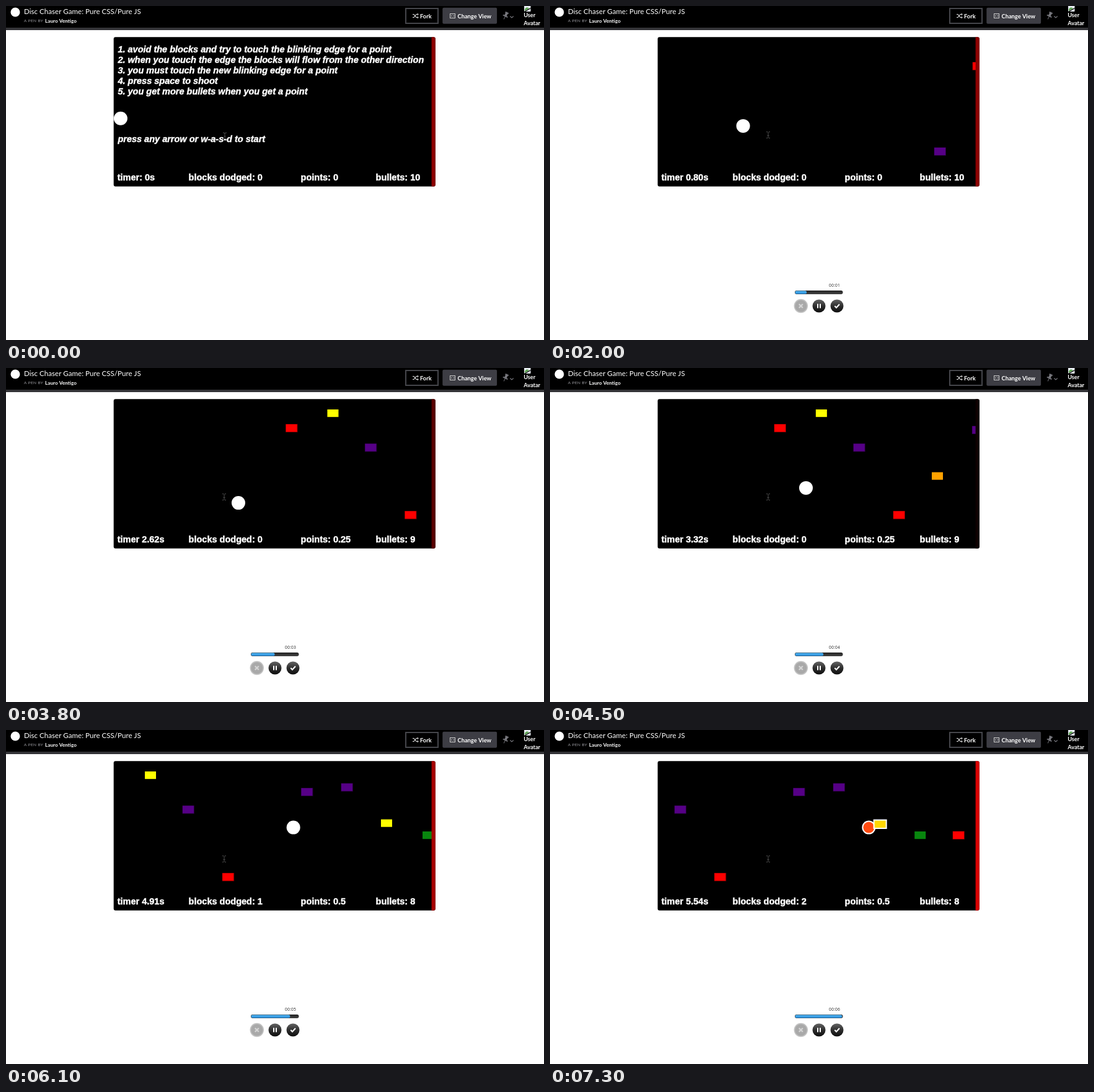
An HTML page with a canvas that plays this animation: 868x540 px, repeating every 7.4 s.

```html
<!DOCTYPE html>
<html lang="en">
<head>
<meta charset="utf-8">
<title>Disc Chaser Game</title>
<style>
  html, body { margin: 0; width: 100%; height: 100%; overflow: hidden; background: #fff; }
  canvas { display: block; }
</style>
</head>
<body>
<canvas id="stage" width="868" height="540"></canvas>
<script>
const ctx = document.getElementById('stage').getContext('2d');
const LOOP = 7400, TICK = 100;
const START = 1200, CRASH = 6755, RECORDER_ON = 300;
const BOARD = { x: 173.7, y: 50.3, w: 519.1, h: 241.4 };
const EDGE = 687, SPEED = 0.128;
const LATO = 'Lato, sans-serif';
const HELV = '"Liberation Sans", Arial, sans-serif';
const RULES = [
  '1. avoid the blocks and try to touch the blinking edge for a point',
  '2. when you touch the edge the blocks will flow from the other direction',
  '3. you must touch the new blinking edge for a point',
  '4. press space to shoot',
  '5. you get more bullets when you get a point'
];
const RED = '#fe0000', PURPLE = '#560086', YELLOW = '#ffff00';

// spawn: time at which the left side meets the edge; end: time it is shot
const blocks = [
  { color: PURPLE, spawn: 1477, y: 229, end: 2900 },
  { color: RED, spawn: 1961, y: 91 },
  { color: YELLOW, spawn: 2483, y: 67 },
  { color: PURPLE, spawn: 2959, y: 122.5 },
  { color: RED, spawn: 3461, y: 231.5 },
  { color: '#ffa200', spawn: 3945, y: 168.5, end: 5150 },
  { color: PURPLE, spawn: 4455, y: 94 },
  { color: PURPLE, spawn: 4959, y: 86.5 },
  { color: YELLOW, spawn: 5459, y: 144.5, hit: true },
  { color: '#08860e', spawn: 5983, y: 164 },
  { color: RED, spawn: 6466, y: 164 }
];
const shots = [
  { from: 2650, to: 2900, x0: 370, x1: 505, y: 232 },
  { from: 4950, to: 5150, x0: 443, x1: 533, y: 171 }
];
// [time, steps right, steps down]
const moves = [
  [1200, 0, 0], [1900, 10, 0], [2000, 10, 1], [2500, 13, 4], [2800, 14, 4],
  [3400, 14, 4], [4100, 16, 2], [4500, 18, 1], [4850, 20, -1], [5200, 20, -1],
  [5800, 22, -2], [6100, 22, -2], [6700, 26, -2]
];

function text(str, x, y, font, color = '#fff', spacing = 0) {
  ctx.font = font;
  ctx.fillStyle = color;
  ctx.letterSpacing = spacing + 'px';
  ctx.fillText(str, x, y);
}

function heavyText(str, x, y, style = '') {
  text(str, x, y, style + 'bold 14.5px ' + HELV);
  ctx.strokeStyle = '#fff';
  ctx.lineWidth = 0.45;
  ctx.strokeText(str, x, y);
}

function rect(x, y, w, h, color) {
  ctx.fillStyle = color;
  ctx.fillRect(x, y, w, h);
}

function round(x, y, w, h, r, fill) {
  ctx.beginPath();
  ctx.roundRect(x, y, w, h, r);
  ctx.fillStyle = fill;
  ctx.fill();
}

function disc(x, y, r, color) {
  ctx.beginPath();
  ctx.arc(x, y, r, 0, Math.PI * 2);
  ctx.fillStyle = color;
  ctx.fill();
}

function line(points, color, width) {
  ctx.beginPath();
  points.forEach(([x, y], i) => i ? ctx.lineTo(x, y) : ctx.moveTo(x, y));
  ctx.strokeStyle = color;
  ctx.lineWidth = width;
  ctx.stroke();
}

function shade(y0, y1, ...colors) {
  const g = ctx.createLinearGradient(0, y0, 0, y1);
  colors.forEach((c, i) => g.addColorStop(i / (colors.length - 1), c));
  return g;
}

function drawHeader() {
  rect(0, 0, 868, 36, '#000');
  rect(0, 35, 868, 4, '#343438');
  disc(15, 10, 7.5, '#fff');
  text('Disc Chaser Game: Pure CSS/Pure JS', 29, 13.2, '11.6px ' + LATO);
  text('A PEN BY', 29, 26.3, '6.4px ' + LATO, '#a0a0a6', 0.4);
  text('Lauro Ventigo', 63, 26.5, 'bold 8.2px ' + LATO);

  ctx.strokeStyle = '#45464b';
  ctx.lineWidth = 2;
  ctx.strokeRect(645, 4, 52, 24);
  line([[656, 13.5], [658, 13.5], [662, 18.5], [665, 18.5]], '#ddd', 1.1);
  line([[656, 18.5], [658, 18.5], [662, 13.5], [665, 13.5]], '#ddd', 1.1);
  line([[663.5, 12], [665.3, 13.5], [663.5, 15]], '#ddd', 1);
  line([[663.5, 17], [665.3, 18.5], [663.5, 20]], '#ddd', 1);
  text('Fork', 668, 19.5, 'bold 9.3px ' + LATO);

  round(704.3, 2.7, 87.8, 26, 2, '#3d3d44');
  ctx.strokeStyle = '#ccc';
  ctx.lineWidth = 1;
  ctx.strokeRect(716.5, 12.5, 8, 7);
  line([[719.8, 14.5], [718.2, 16], [719.8, 17.5]], '#ccc', 0.9);
  line([[721.6, 14.5], [723.2, 16], [721.6, 17.5]], '#ccc', 0.9);
  text('Change View', 728.5, 19.5, 'bold 9.3px ' + LATO);

  ctx.save();
  ctx.translate(806, 15.5);
  ctx.rotate(0.45);
  rect(-2.8, -6, 5.6, 2, '#77777d');
  rect(-1.9, -4.5, 3.8, 5, '#77777d');
  rect(-4.2, 0, 8.4, 1.8, '#77777d');
  rect(-0.5, 1.5, 1, 5, '#77777d');
  ctx.restore();
  line([[813.3, 16.5], [816, 19], [818.7, 16.5]], '#77777d', 1.1);

  round(836, -4, 10.5, 13, 1, '#e9eef4');
  ctx.beginPath();
  ctx.moveTo(837, 5);
  ctx.quadraticCurveTo(840, 0, 844, 4);
  ctx.lineTo(837, 8);
  ctx.fillStyle = '#62a857';
  ctx.fill();
  line([[837, 9], [846.5, 3.5]], '#000', 1.3);
  text('User', 835.2, 17.5, 'bold 9.2px ' + LATO);
  text('Avatar', 835.2, 30.5, 'bold 9.2px ' + LATO);
}

function ballAt(t) {
  let i = moves.findIndex(m => m[0] > t);
  if (i < 0) i = moves.length;
  const a = moves[Math.max(0, i - 1)], b = moves[Math.min(i, moves.length - 1)];
  const k = b[0] > a[0] ? (t - a[0]) / (b[0] - a[0]) : 0;
  const step = n => Math.round(a[n] + (b[n] - a[n]) * k);
  return { x: 184.9 + step(1) * 12.67, y: 181.8 + step(2) * 12.1 };
}

function drawBlocks(t, crashed) {
  for (const b of blocks) {
    const x = EDGE - SPEED * (t - b.spawn);
    if (t < b.spawn || t >= b.end || x < BOARD.x) continue;
    if (crashed && b.hit) {
      rect(x + 0.5, b.y, 22, 15.5, '#fff');
      rect(x + 2.5, b.y + 2, 18, 11.5, '#ffd800');
      continue;
    }
    if (b.color === PURPLE || b.color === RED) {
      ctx.globalAlpha = 0.4;
      rect(x - 0.5, b.y - 0.5, 19.5, 13.5, b.color);
      ctx.globalAlpha = 1;
    }
    rect(x, b.y, 18, 12.2, b.color);
  }
}

function drawStatus(t) {
  const s = (t - START) / 1000 + 0.02 * Math.sin(Math.PI * (t - 2000) / 5000);
  const timer = t <= START ? 'timer: 0s' : `timer ${Math.min(5.54, Math.max(0, s)).toFixed(2)}s`;
  const dodged = blocks.filter(b => !b.end && EDGE - SPEED * (t - b.spawn) < BOARD.x).length;
  const points = shots.filter(b => t >= b.to).length * 0.25;
  const bullets = 10 - shots.filter(b => t >= b.from).length;
  heavyText(timer, 179.7, 282.2);
  heavyText('blocks dodged: ' + dodged, 294.6, 282.2);
  heavyText('points: ' + points, 475.6, 282.2);
  heavyText('bullets: ' + bullets, 596.6, 282.2);
}

function drawBoard(now) {
  const t = Math.min(now, CRASH), crashed = now >= CRASH;
  ctx.save();
  ctx.beginPath();
  ctx.roundRect(BOARD.x, BOARD.y, BOARD.w, BOARD.h, 3);
  ctx.clip();
  rect(173, 50, 520, 242, '#000');

  if (t <= START) {
    RULES.forEach((r, i) => heavyText(r, 180.4, 75.4 + i * 16.9, 'italic '));
    heavyText('press any arrow or w-a-s-d to start', 180.4, 220.2, 'italic ');
  }
  const ball = ballAt(t);
  disc(ball.x, ball.y, 11, '#fff');
  if (crashed) disc(ball.x, ball.y, 9, '#ff4a10');
  drawBlocks(t, crashed);
  for (const s of shots) {
    if (t < s.from || t >= s.to) continue;
    disc(s.x0 + (s.x1 - s.x0) * (t - s.from) / (s.to - s.from), s.y, 2.5, '#fff');
  }
  drawStatus(t);

  const glow = Math.round(255 * ((now / 1000 + 0.55) % 1));
  rect(EDGE - 0.4, 50, 7, 242, `rgb(${glow},0,0)`);
  ctx.restore();
}

function drawCursor(t) {
  const k = Math.min(1, t / 500), x = 353 - k, y = 210 - 1.5 * k;
  const c = '#4c4c4c';
  line([[x - 3, y - 5], [x - 1, y - 5], [x, y - 4], [x + 1, y - 5], [x + 3, y - 5]], c, 1);
  line([[x - 3, y + 5], [x - 1, y + 5], [x, y + 4], [x + 1, y + 5], [x + 3, y + 5]], c, 1);
  line([[x, y - 4], [x, y + 4]], c, 1);
  line([[x - 1.5, y + 1], [x + 1.5, y + 1]], c, 1);
}

function drawRecorder(t) {
  if (t < RECORDER_ON) return;
  const sec = Math.max(0, Math.floor((t - 400) / 1000));
  text('00:0' + sec, 450, 453.7, '6.6px "Noto Sans", sans-serif', '#333', 0.25);

  round(395, 460, 77.5, 6, 3, shade(460, 466, '#222', '#444'));
  const w = Math.min(76.5, 0.0108 * t - 3);
  if (w > 0) round(395.5, 460.5, w, 5, 2.5, shade(460, 466, '#5fbdf5', '#1b86d8'));

  disc(404.8, 485, 11.2, '#c2c2c2');
  disc(404.8, 485, 9.6, '#a9a9a9');
  line([[401.8, 482], [407.8, 488]], '#d4d4d4', 2.4);
  line([[407.8, 482], [401.8, 488]], '#d4d4d4', 2.4);

  for (const x of [434, 463]) disc(x, 485, 10.5, shade(475, 496, '#626262', '#2c2c2c', '#0c0c0c'));
  rect(431, 481.5, 2, 7, '#fff');
  rect(435, 481.5, 2, 7, '#fff');
  line([[459.3, 485], [462, 487.7], [467, 482.3]], '#fff', 2.1);
}

function frame(now) {
  const t = Math.floor((now % LOOP) / TICK) * TICK;
  rect(0, 0, 868, 540, '#fff');
  drawHeader();
  drawBoard(t);
  drawCursor(t);
  drawRecorder(t);
}

let origin = null;
function loop(now) {
  if (origin === null) origin = now;
  frame(now - origin);
  requestAnimationFrame(loop);
}
requestAnimationFrame(loop);
</script>
</body>
</html>
```
